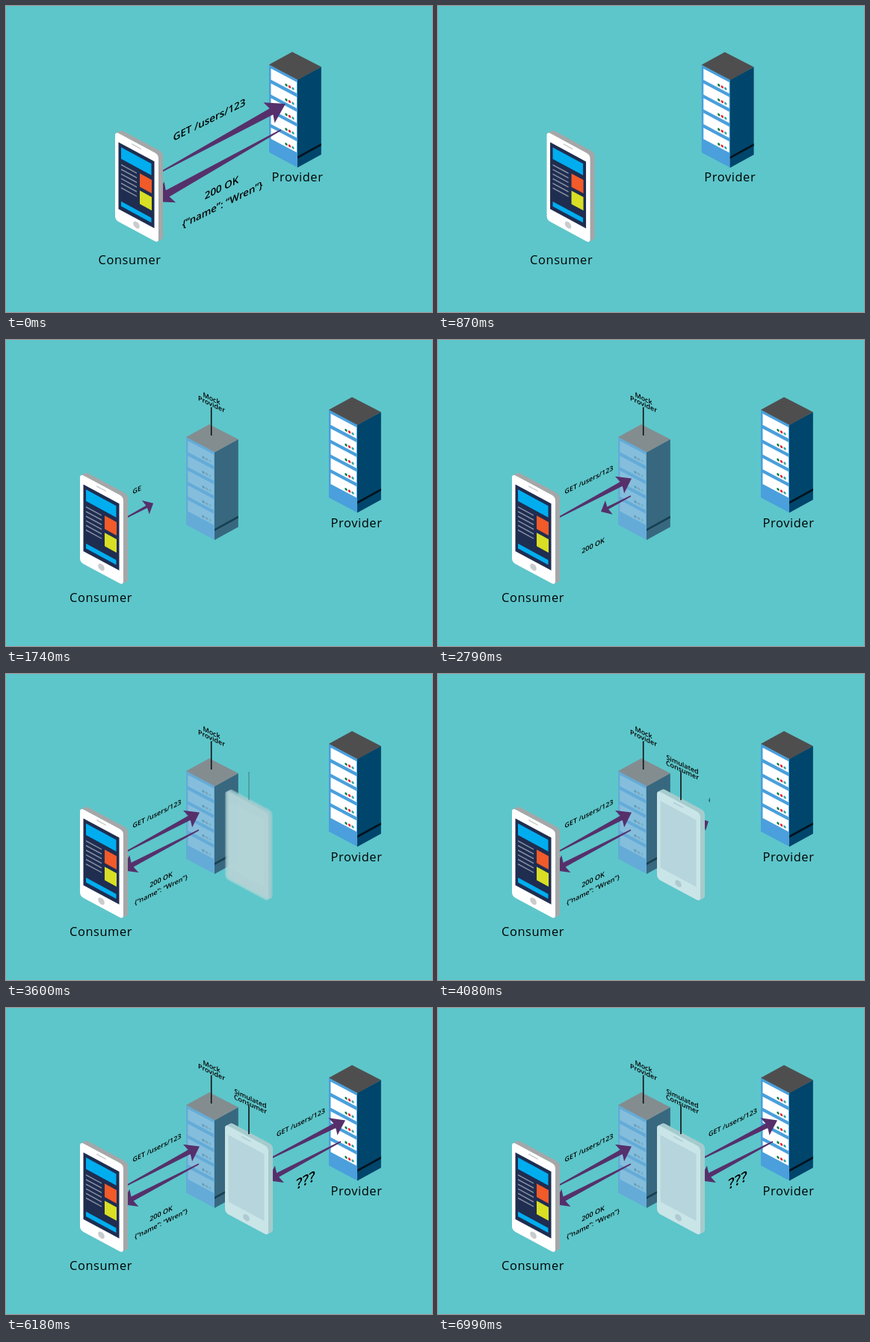
An HTML page with a canvas that plays this animation: 570 px wide and 410 px high, repeating every 7020 ms.

```html
<!DOCTYPE html>
<html lang="en">
<head>
<meta charset="utf-8">
<title>Consumer and provider</title>
<style>
html, body { margin: 0; width: 100%; height: 100%; overflow: hidden; background: #5dc6ca; }
canvas { display: block; }
</style>
</head>
<body>
<canvas id="stage" width="570" height="410"></canvas>
<script>
const ctx = document.getElementById('stage').getContext('2d');
const LOOP = 7020, STEP = 30;
const FONT = '"Open Sans", "Noto Sans", sans-serif';
const PURPLE = '#55306b';

const REAL_PHONE = { side: '#a5a7a8', face: '#ffffff', screen: '#1f2d50', button: '#c9cbcd', full: true };
const GHOST_PHONE = { side: '#a6cbcd', face: '#c9e5e8', screen: '#b6d5dc', button: '#aecbd3', full: false };
const REAL_SERVER = {
  top: '#4e4e4f', left: '#4a9fdc', right: '#00456b', panel: '#ffffff', gap: '#04121c',
  dots: ['#0c7a43', '#e8202c', '#2ba3a8']
};
const GHOST_SERVER = {
  top: '#838d90', left: '#64abd8', right: '#37687f', panel: '#85bedc', gap: '#173f50',
  dots: ['#5b9db5', '#7ba3bd', '#6fb3cb']
};

const clamp = v => Math.max(0, Math.min(1, v));
const span = (t, from, length) => clamp((t - from) / length);
const mix = (a, b, p) => a + (b - a) * p;
const smooth = p => (1 - Math.cos(Math.PI * p)) / 2;

function poly(color, ...pts) {
  ctx.fillStyle = color;
  ctx.beginPath();
  pts.forEach(([x, y]) => ctx.lineTo(x, y));
  ctx.closePath();
  ctx.fill();
}

function box(color, x, y, w, h, r = 0) {
  ctx.fillStyle = color;
  ctx.beginPath();
  ctx.roundRect(x, y, w, h, r);
  ctx.fill();
}

function disc(color, x, y, r) {
  ctx.fillStyle = color;
  ctx.beginPath();
  ctx.arc(x, y, r, 0, 7);
  ctx.fill();
}

function group(alpha, draw) {
  if (alpha <= 0) return;
  ctx.save();
  ctx.globalAlpha = alpha;
  draw();
  ctx.restore();
}

function phone(x, y, c) {
  ctx.save();
  ctx.transform(1, 0.54, 0, 1, x, y);
  // extruded edge, then the front face
  for (let d = 6; d > 0; d -= 0.5) box(c.side, d, 1 - d * 1.05, 58, 118.5, 5);
  box(c.face, 0, 1, 58, 118.5, 5);
  box(c.screen, 4.5, 13, 48, 89.5);
  box(c.button, 22, 5, 13, 1.6, 0.8);
  disc(c.button, 28.5, 111, 4.3);
  if (c.full) {
    box('#00adef', 8, 18, 40.5, 15.5);
    for (let i = 0; i < 6; i++) box('#8991a3', 8, 40.5 + i * 6.2, 21, 1.7);
    box('#f15a29', 33, 39.5, 16, 18);
    box('#d8df25', 33, 62.5, 16, 18);
    box('#00adef', 8, 90.5, 40.5, 6.5);
  }
  ctx.restore();
}

function server(x, y, c) {
  ctx.save();
  ctx.translate(x, y);
  poly(c.left, [0, 17], [38.5, 37], [38.5, 155], [0, 134.5]);
  poly(c.right, [38, 37], [69.8, 20], [69.8, 137.5], [38, 155]);
  poly(c.top, [0, 17], [31, 0], [69.8, 20], [38.5, 37.5]);
  poly(c.gap, [38, 140], [69.8, 122.5], [69.8, 125.5], [38, 143]);
  ctx.transform(1, 0.53, 0, 1, 0, 0);
  for (let i = 0; i < 5; i++) {
    const top = 21 + i * 19.8;
    box(c.panel, 2.5, top, 34.5, 15);
    c.dots.forEach((color, k) => disc(color, 23 + k * 4.5, top + 11.2, 1.7));
  }
  ctx.restore();
}

// Tapered arrow whose head grows along with its length.
function arrow(x0, y0, x1, y1, p = 1) {
  if (p <= 0) return;
  const len = Math.hypot(x1 - x0, y1 - y0) * p;
  const half = (18 + 0.07 * len) / 2;
  const head = Math.min(len, 8 + 0.09 * len);
  const neck = len - head * 0.86;
  const thick = 1 + len * 0.02;
  ctx.save();
  ctx.translate(x0, y0);
  ctx.rotate(Math.atan2(y1 - y0, x1 - x0));
  poly(PURPLE, [0, -0.8], [neck, -thick], [len - head, -half], [len, 0],
    [len - head, half], [neck, thick], [0, 0.8]);
  ctx.restore();
}

// Centred text on a slanted baseline, revealed from the left.
function slanted(str, x, y, size, slope, weight = 600, p = 1) {
  if (p <= 0) return;
  ctx.save();
  ctx.transform(1, slope, 0, 1, x, y);
  ctx.font = `${weight} ${size}px ${FONT}`;
  if (p < 1) {
    const w = ctx.measureText(str).width;
    ctx.beginPath();
    ctx.rect(-w / 2, -size * 1.2, w * p, size * 1.7);
    ctx.clip();
  }
  ctx.fillStyle = '#000';
  ctx.fillText(str, 0, 0);
  ctx.restore();
}

const rising = (str, x, y, size, p) => slanted(str, x, y, size, -0.5, 600, p);

function label(str, x, y) {
  ctx.letterSpacing = '0.6px';
  slanted(str, x, y, 16.4, 0, 400);
  ctx.letterSpacing = '0px';
}

function sign(first, second, x, y) {
  slanted(first, x, y - 7.5, 8.9, 0.47, 600);
  slanted(second, x, y, 8.9, 0.47, 600);
}

function pole(x, y) {
  box('#111', x - 0.8, y, 1.6, 38);
}

const REQUEST = 'GET /users/123', STATUS = '200 OK', BODY = '{“name”: “Wren”}';

function intro() {
  arrow(207, 222.5, 374, 131);
  arrow(368, 166, 197, 262);
  rising(REQUEST, 272, 157, 13.4);
  rising(STATUS, 288.5, 248, 13.4);
  rising(BODY, 289.5, 270.5, 13.2);
}

function doubt(t) {
  const n = t < 5400 ? 0 : t < 5580 ? 1 : t < 5760 ? 2 : 3;
  if (n) rising('?'.repeat(n), 405.5 - n * 1.5, 232.5 + n * 1.5, 8.7 + n * 3.3);
}

function render(t) {
  ctx.globalAlpha = 1;
  ctx.fillStyle = '#5dc6ca';
  ctx.fillRect(0, 0, 570, 410);
  ctx.textAlign = 'center';

  const move = smooth(span(t, 840, 480));
  const mock = span(t, 1320, 240);
  const sim = span(t, 3540, 240);

  server(mix(352, 432, move), mix(61.5, 76.5, move), REAL_SERVER);
  label('Provider', mix(390, 469, move), mix(234.5, 251, move));
  label('Consumer', mix(165.5, 127, move), mix(346, 350.5, move));

  group(mock, () => {
    server(241, 113, GHOST_SERVER);
    pole(274.7, 90);
    sign('Mock', 'Provider', 275, 89);
  });

  group(1 - span(t, 300, 300), intro);

  arrow(160, 238.5, 259, 185.5, span(t, 1560, 480));
  arrow(258, 209, 155, 263, span(t, 2600, 490));
  arrow(350, 203.5, 454, 150.5, span(t, 4025, 480));
  arrow(448, 179, 350, 231, span(t, 5235, 480));

  phone(mix(146, 99, move), mix(167, 178, move), REAL_PHONE);
  group(sim, () => {
    phone(293, 154.5, GHOST_PHONE);
    pole(325, 131);
  });
  group(span(t, 3720, 150), () => sign('Simulated', 'Consumer', 327, 132));

  rising(REQUEST, 202, 190.5, 9, span(t, 1590, 825));
  rising(STATUS, 207.5, 278.5, 9, span(t, 2460, 300));
  rising(BODY, 207.5, 292, 8.7, span(t, 3000, 420));
  rising(REQUEST, 394.5, 156.5, 9, span(t, 4060, 825));
  doubt(t);
}

const start = performance.now();
function tick() {
  const t = (performance.now() - start) % LOOP;
  render(Math.floor(t / STEP) * STEP);
  requestAnimationFrame(tick);
}
tick();
</script>
</body>
</html>
```
